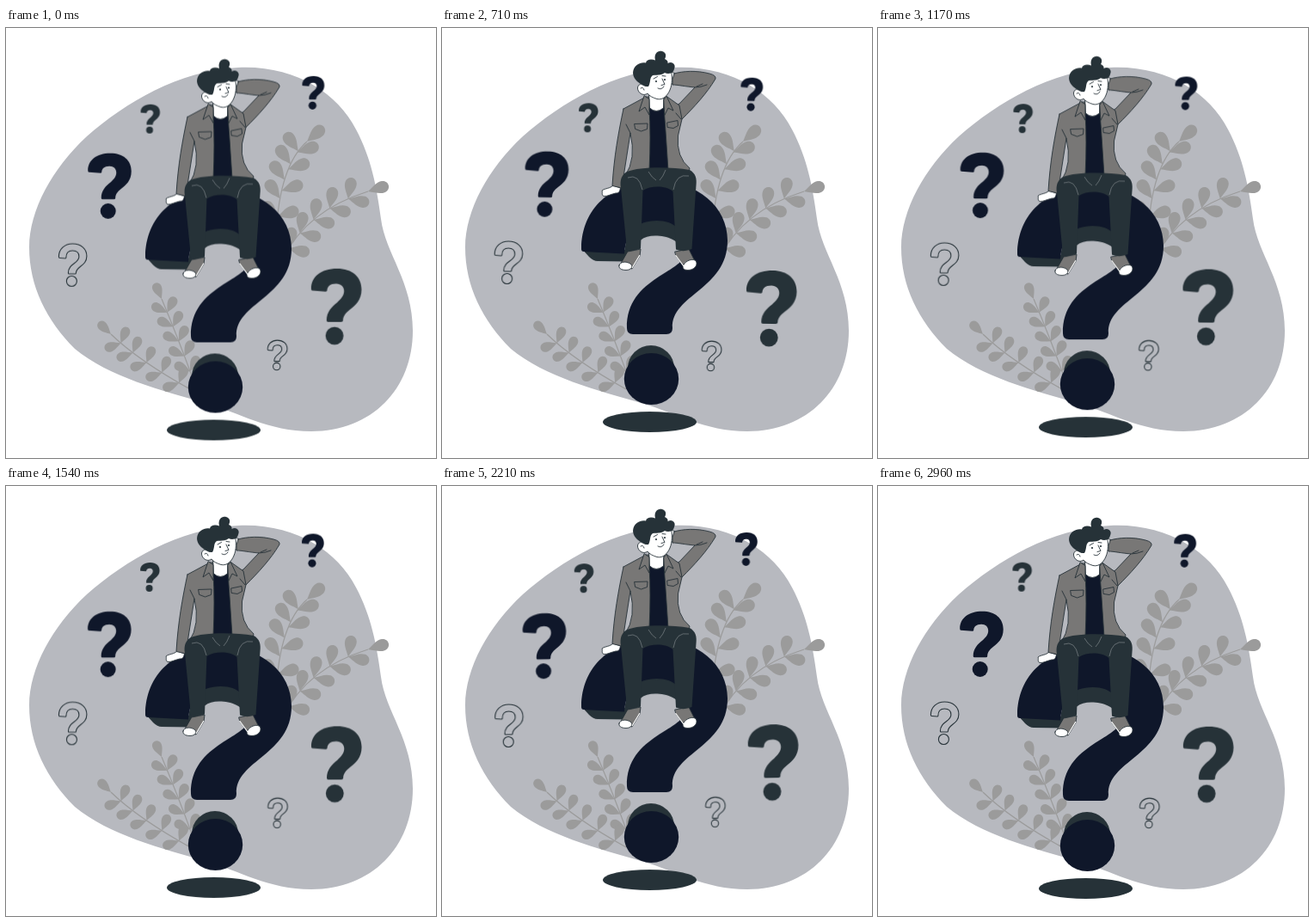
Recreate the animation shown at these times as an HTML page. Size 500 by 500 pixels, loop 3000 ms.

```html
<!DOCTYPE html>
<html lang="en">
<head>
<meta charset="utf-8">
<title>Thinking man on a question mark</title>
<style>
  html, body { margin: 0; width: 100%; height: 100%; overflow: hidden; background: #fff; }
  svg { display: block; width: 100vw; height: 100vh; }
  .navy { fill: #0f172a; }
  .dark { fill: #263238; }
  .gray { fill: #787776; }
  .white { fill: #fff; }
  .none { fill: none; }
  .ink { stroke: #263238; stroke-width: .9; stroke-linejoin: round; stroke-linecap: round; }
  .leaf { fill: #9b9b9b; }
  .stem { fill: none; stroke: #9b9b9b; stroke-width: 1.2; }
  .hollow { fill: none; stroke: #263238; stroke-width: 1.1; }
  .hollow.small { stroke-width: 1.5; }
  .float { animation: float 1.5s linear -40ms infinite; }
  .sway { transform-origin: 250px 250px; animation: sway 3s linear -40ms infinite; }
  @keyframes float {
    0%, 100% { transform: translateY(10px); }
    50% { transform: translateY(0); }
  }
  @keyframes sway {
    0%, 100% { transform: rotate(0deg); }
    25% { transform: rotate(1deg); }
    75% { transform: rotate(-1deg); }
  }
</style>
</head>
<body>
<svg viewBox="0 0 500 500">
  <defs>
    <g id="bold">
      <path d="M97 168 Q96 168 96 166 C96 154 106 146 122 146 C137 146 146.500 154 146.500 167 C146.500 178 140 183 135 187 C130 191 128 194 128 198 Q128 199.500 126 199.500 L113 199.500 Q111.500 199.500 111.500 198 C111.500 189 117 184 122 180 C126 176.500 129 173 129 168.500 C129 164 126 161 121 161 C115 161 112 164 112 168 Q112 169 110.500 169 Z"/>
      <circle cx="119.500" cy="213.300" r="9"/>
    </g>
    <g id="thin">
      <path d="M63 267.500 Q62 267.500 62 266 C62 257 69 251 78 251 C88 251 94.500 257 94.500 265.500 C94.500 277 82 277 82 285 Q82 286 81 286 L74 286 Q73 286 73 285 C73 274 85.500 274 85.500 266 C85.500 261.500 82.500 259 78 259 C73 259 70.500 262 70.500 267 Q70.500 268 69.500 268 Z"/>
      <circle cx="77" cy="294.500" r="6"/>
    </g>
  </defs>

  <path fill="#b7b9bf" d="M27 255 C27 212 54 163 94 126 C140 86 200 50 270 46 C335 43 385 75 407 118 C425 152 431 185 436 222 C441 262 473 295 473 352 C473 420 425 469 355 469 C305 469 270 447 235 437 C180 421 120 406 80 373 C47 340 27 300 27 255Z"/>

  <g id="plants"></g>

  <g class="sway">
    <use href="#bold" class="navy" transform="translate(-.8 -.3)"/>
    <use href="#bold" class="dark" transform="translate(243.500 110.300) scale(1.16)"/>
    <use href="#bold" class="navy" transform="translate(295.300 -18.700) scale(.51)"/>
    <use href="#bold" class="dark" transform="translate(113.700 23.800) scale(.445)"/>
    <use href="#thin" class="hollow" transform="translate(-.6 0)"/>
    <use href="#thin" class="hollow small" transform="translate(261 187.300) scale(.7)"/>
  </g>

  <g class="float">
    <ellipse class="dark" cx="241.500" cy="458" rx="54.500" ry="12"/>
    <ellipse class="dark" cx="243" cy="395.500" rx="27" ry="26.500"/>
    <ellipse class="navy" cx="243.500" cy="408" rx="31.700" ry="30"/>

    <!-- big question mark -->
    <path class="dark" d="M212 263 C214 236 225 222 250 222 C270 222 284 235 284 262 C275 246 262 241.500 248 241.500 C234 241.500 225 248 222 263Z"/>
    <path class="dark" d="M162 256 L171 266 Q176 271 181 271 L216 271.500 L216 258Z"/>
    <path class="navy" d="M162 257 C162 210 197 178 248 178 C298 178 332 208 332 247 C332 304 266 310 268 349 Q268 356 261 356 L222 356 Q215 356 215 349 C214 288 286 285 283 258 C282 235 270 224 250 224 C225 224 214 238 212 262.500 L165 260 Q162 260 162 257Z"/>

    <!-- raised arm -->
    <path class="white ink" d="M261 53 C264 50 268 51 271 53 L271 64 C267 64 265 67 262 65Z"/>
    <path class="gray ink" d="M270 53 C280 50 296 49 311 53 Q319 55 318 59 C308 76 293 92 279 106 L268 92 L276 88 L294 69 C283 68 274 66 268 66 Q267 60 270 53Z"/>
    <path class="none ink" d="M294 69 Q301 69 308 66 M296 68 L303 65"/>

    <!-- torso and resting arm -->
    <path class="white ink" d="M199 183 L207.500 186 C206.500 190 206 192 202 192 C197 193 192 196 188 195.500 C185 194 187 191 186 189 C190 186 195 187 199 183Z"/>
    <path class="gray ink" d="M211 94 L237 80 L262 80 L276 90 L279 106 L274.500 125 Q272 150 288 163 L286 172 L213 172 Q226 152 219 122 L209 186 L198 183.500 C200 150 205 122 211 94Z"/>
    <path class="none ink" d="M214 112 L219 122 M278 106 L272 99 M224 111.500 L239 111 L238.500 117.500 L231.500 120 L225 117.500Z M262 110 L274 107.500 L274.500 113.500 L269 116.500 L262.500 115.500Z"/>
    <path class="navy ink" d="M241 92 L258 92 L260 120 L263 166 L241 166 Q243 125 241 92Z"/>
    <path class="white ink" d="M241 76 L258 76 L257.500 93 Q249 100 241.500 93Z"/>
    <path class="gray ink" d="M235 79 L229 97 L236 92 L241 101 L241 83Z M258 83 L261 79 L269 96 L263 93 L259 101Z"/>

    <!-- head -->
    <path class="white ink" d="M238 52 L266 47 C268 56 268 65 265 72 C262 79 257 84 250 82.500 C245 81 241 79 239 76 C234 80 227 75 227.500 69 C229 63.500 235 64 238 67Z"/>
    <path class="dark" d="M237 68 C229 65 220 58 222.500 49 C224 43 231 39 237 40.500 C238 36 244 36 248 37.500 C246 30 251 26 255 26.800 C260 27.500 261.500 32 259 36 C262 37 263 39 262.500 41 C268 38 272.500 43 270 47.500 C269 53 263 54 259 52 C254 56 249 54 245 55 C241 58 243 63 240 68Z"/>
    <path class="none ink" d="M246 59 L250.500 56.500 M256 55.500 L260 56 M256 59 L259 65.500 L255 66.500 M251 70 Q255 72.500 258 68 M231 70 Q234 68 235 72"/>
    <circle class="dark" cx="249" cy="62" r="1.100"/>
    <circle class="dark" cx="259" cy="60" r="1.100"/>

    <!-- shoes -->
    <path class="gray ink" d="M216 260 L231 257 L230 265 L221 280 L207 276Z"/>
    <path class="gray ink" d="M271 260 L287 257 L295 273 L283 280 L272 265Z"/>
    <path class="white ink" d="M206 276 C207 271.500 214 271 219 274 C223 277 220 281.500 214 281.500 C208 281.500 205 279 206 276Z"/>
    <path class="white ink" d="M281 275 C284 270 292 267.500 295.500 271 C298 277 292 281.500 286 281.500 C280 281.500 279 278 281 275Z"/>
    <path fill="none" stroke="#fff" stroke-width="1.200" d="M230 264 L221 279 M271.500 264 L281 277"/>

    <!-- trousers -->
    <path class="dark" d="M215 167 C230 161 265 161 288 165 C295 169 296.500 175 295.500 183 L290.500 257 Q281 261 272 257.500 L268.500 190 C260 183 243 183 233.500 189 L231 256.500 Q223 260 215 257.500 L208 186 C206.500 176 209 171 215 167Z"/>
    <path fill="none" stroke="#8e9497" stroke-width=".6" d="M240 167 Q244 174 249 177 M260 165 Q257 173 253 177 M216 174 Q229 169 233 188 M287 172 Q272 169 269 188"/>
  </g>
</svg>
<script>
  // A teardrop pointed at its base, rounded at its tip.
  function leaf(x, y, degrees, size) {
    return `<path class="leaf" transform="translate(${x} ${y}) rotate(${degrees}) scale(${size})"
      d="M0 0 C.3 .14 .5 .3 .75 .27 C1.08 .22 1.08 -.22 .75 -.27 C.5 -.3 .3 -.14 0 0Z"/>`;
  }

  // Leaves sit at even steps along a curved stem, each side holding one direction.
  function plant({ from, via, to, left, right, aim, spread, size }) {
    const along = (t, k) => (1 - t) ** 2 * from[k] + 2 * t * (1 - t) * via[k] + t * t * to[k];
    const side = (count, degrees) => Array.from({ length: count }, (_, i) => {
      const t = .9 * (i + .6) / count;
      return leaf(along(t, 0), along(t, 1), degrees, size);
    }).join("");
    const end = Math.atan2(to[1] - via[1], to[0] - via[0]) * 180 / Math.PI;
    return `<path class="stem" d="M${from}Q${via} ${to}"/>`
      + side(left, aim - spread) + side(right, aim + spread) + leaf(...to, end, size);
  }

  document.getElementById("plants").innerHTML = [
    { from: [314, 240], via: [318, 160], to: [350, 132], left: 5, right: 4, aim: -72, spread: 54, size: 26 },
    { from: [322, 268], via: [350, 212], to: [421, 190], left: 5, right: 5, aim: -34, spread: 46, size: 25 },
    { from: [218, 410], via: [200, 360], to: [181, 315], left: 5, right: 5, aim: -109, spread: 46, size: 20 },
    { from: [214, 420], via: [153, 386], to: [122, 356], left: 5, right: 5, aim: -134, spread: 66, size: 20 }
  ].map(plant).join("");
</script>
</body>
</html>
```
